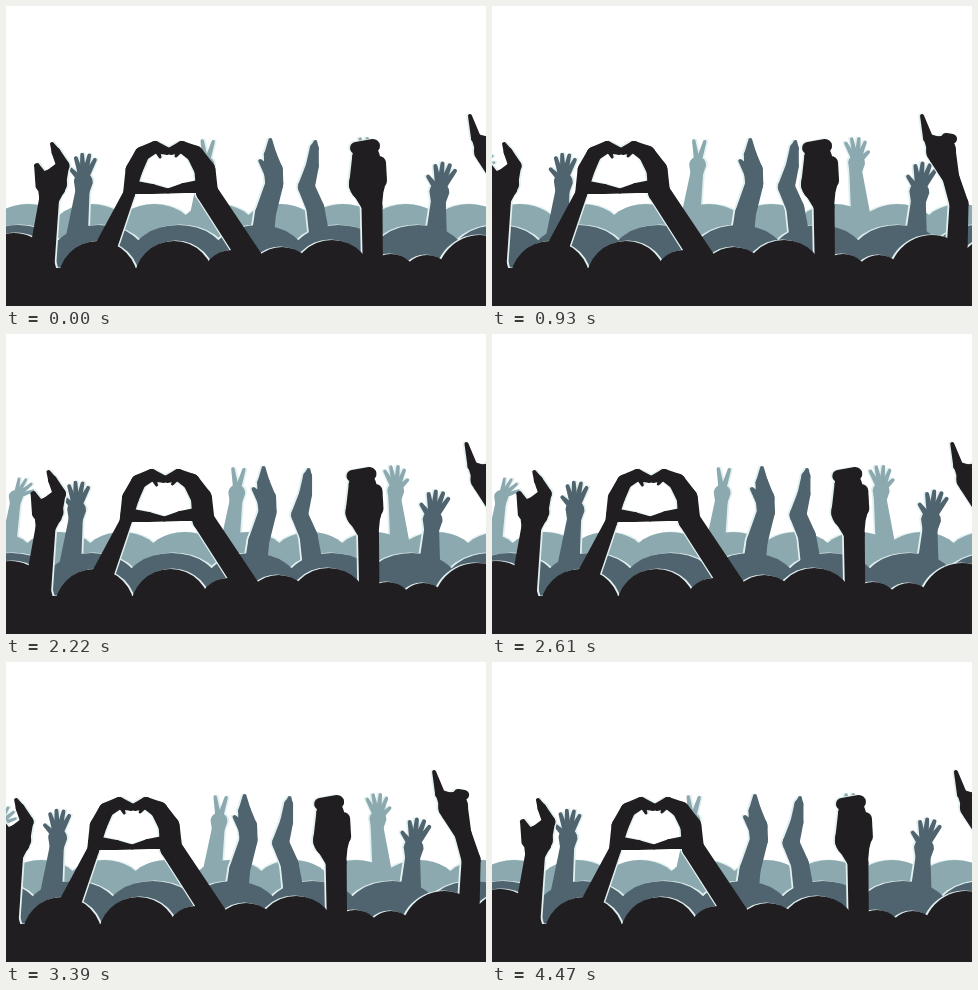
An HTML page with a canvas that plays this animation: 480 px wide and 300 px high, repeating every 4.5 s.

```html
<!DOCTYPE html>
<html lang="en">
<head>
<meta charset="utf-8">
<title>Cheering crowd</title>
<style>
  html, body { margin: 0; width: 100%; height: 100%; overflow: hidden; background: #fff; }
  canvas { display: block; }
</style>
</head>
<body>
<canvas id="stage" width="480" height="300"></canvas>
<script>
const ctx = document.getElementById('stage').getContext('2d');
const LOOP = 4500, STEP = 30, RIM = '#e2f0f0';

function head(x, y, rx, ry = rx) {
  const path = new Path2D();
  path.ellipse(x, y, rx, ry, 0, 0, 7);
  return { path, x };
}

// Evenly spaced row of heads across and beyond the stage.
function row(first, gap, y, rx, ry) {
  const heads = [];
  for (let x = first; x < 560; x += gap) heads.push(head(x, y, rx, ry));
  return heads;
}

function ground(y) {
  const path = new Path2D();
  path.rect(-80, y, 660, 300);
  return { path, x: 0 };
}

// Chain of tapered capsules through [x, y, radius] joints.
function limb(...joints) {
  return joints.slice(1).map(([x2, y2, r2], i) => {
    const [x1, y1, r1] = joints[i];
    const a = Math.atan2(y2 - y1, x2 - x1), q = Math.PI / 2;
    const path = new Path2D();
    path.arc(x1, y1, r1, a + q, a + 3 * q);
    path.arc(x2, y2, r2, a - q, a + q);
    return { path, x: joints[0][0] };
  });
}

// Open hand: fingers fanned around the tilt, optional thumb on side -1 or 1.
function hand(x, y, r, footX, { tilt = 0, spread = 15, count = 4, thumb = 0 }) {
  const finger = (degrees, length) => {
    const a = degrees * Math.PI / 180, dx = r * Math.sin(a), dy = -r * Math.cos(a);
    return limb([x + dx * .6, y + dy * .6, r * .34], [x + dx * length, y + dy * length, r * .2]);
  };
  const parts = limb([x, y, r], [x - r * .1, y + r, r * .75], [footX, y + 60, r * 1.2]);
  for (let i = 0; i < count; i++) {
    const k = i - (count - 1) / 2;
    parts.push(...finger(tilt + k * spread, 2.9 - .12 * k * k));
  }
  if (thumb) parts.push(...finger(tilt + thumb * 50, 1.9));
  return parts;
}

const heart = [
  ...limb([90, 264, 13], [123, 188, 6], [128, 164, 8.5], [136, 148, 7.5], [149, 141, 6], [161, 145, 4]),
  ...limb([125, 181, 7], [146, 183, 5], [162, 185, 2.5]),
  ...limb([252, 264, 12], [201, 186, 11], [199, 164, 10.5], [189, 148, 8.5], [176, 141, 6], [165, 145, 4]),
  ...limb([198, 180, 7], [178, 182, 5], [162, 185, 2.5]),
  ...limb([151, 144, 3], [154, 151, 1.5]),
  ...limb([174, 144, 3], [170, 150, 1.5])
];

const claps = [
  ...limb([254, 250, 12], [259, 208, 10.5], [268, 178, 9], [267, 164, 9.5], [264, 149, 6.5], [264, 134, 2]),
  ...limb([264, 168, 6], [254, 155, 2]),
  ...limb([316, 250, 11], [309, 202, 9], [300, 181, 8.5], [306, 160, 6.5], [308, 142, 4.5], [309, 136, 2])
];

const cupped = [
  ...limb([34, 266, 14], [43, 194, 10], [46, 178, 15], [57, 160, 6.5], [50, 146, 4.5], [46, 138, 2]),
  ...limb([38, 178, 9], [31, 160, 3])
];

const fist = [
  ...limb([367, 272, 10], [366, 200, 10.5], [361, 178, 18], [360, 152, 14]),
  ...limb([350, 142, 6], [367, 140, 7]),
  ...limb([373, 157, 7], [374, 175, 7])
];

const pointer = [
  ...limb([464, 110, 2], [470, 132, 5], [483, 145, 15], [493, 172, 8.5], [501, 198, 9.5], [498, 266, 11]),
  ...limb([488, 132, 5], [494, 133, 5])
];

// Each layer swings between [time, offset] turning points.
const layers = [
  {
    color: '#8ba9af',
    turns: [[500, 8], [1380, 3], [2350, 32], [3750, 9.5], [4480, 0]],
    parts: [
      ground(222),
      ...row(-104, 63, 223, 38, 25),
      ...hand(-21, 163, 7, -30, { tilt: 40, spread: 20 }),
      ...hand(200, 159, 8.5, 192, { tilt: 4, spread: 26, count: 2 }),
      ...hand(359, 157, 8.5, 364, { tilt: -3, spread: 17, thumb: 1 })
    ]
  },
  {
    color: '#4f646f',
    turns: [[400, 10], [1640, -30.5], [2600, 6], [3660, -31]],
    parts: [
      ground(248),
      ...row(-68, 80, 253, 48, 34),
      ...hand(77, 176, 9.5, 70, { tilt: 5, thumb: -1 }),
      ...claps,
      ...hand(433, 186, 10, 429, { tilt: 14, thumb: -1 })
    ]
  },
  {
    color: '#211e22',
    turns: [[0, 0], [1180, -38], [2430, -1], [3430, -36]],
    parts: [
      ground(262),
      ...[[8, 48], [92, 40], [168, 40], [226, 31], [276, 34], [326, 41], [385, 27], [421, 26], [474, 46], [540, 46]]
        .map(([x, r]) => head(x, 275, Math.min(r, 44), r)),
      ...cupped, ...heart, ...fist, ...pointer
    ]
  }
];

function sway(turns, t) {
  const last = turns.length - 1;
  let i = last;
  while (i >= 0 && turns[i][0] > t) i--;
  const [t0, v0] = i < 0 ? [turns[last][0] - LOOP, turns[last][1]] : turns[i];
  const [t1, v1] = i === last ? [turns[0][0] + LOOP, turns[0][1]] : turns[i + 1];
  return v0 + (v1 - v0) * (1 - Math.cos(Math.PI * (t - t0) / (t1 - t0))) / 2;
}

// The rim light falls from the middle of the stage.
function paint(parts, color, shift) {
  ctx.fillStyle = color;
  for (const { path, x } of parts) {
    const dx = x < 240 ? shift : -shift;
    ctx.translate(dx, -shift / 3);
    ctx.fill(path);
    ctx.translate(-dx, shift / 3);
  }
}

function draw() {
  const t = Math.floor(performance.now() % LOOP / STEP) * STEP;
  ctx.fillStyle = '#fff';
  ctx.fillRect(0, 0, 480, 300);
  for (const { color, turns, parts } of layers) {
    ctx.save();
    ctx.translate(sway(turns, t), 0);
    paint(parts, RIM, 1.8);
    paint(parts, color, 0);
    ctx.restore();
  }
  requestAnimationFrame(draw);
}
draw();
</script>
</body>
</html>
```
